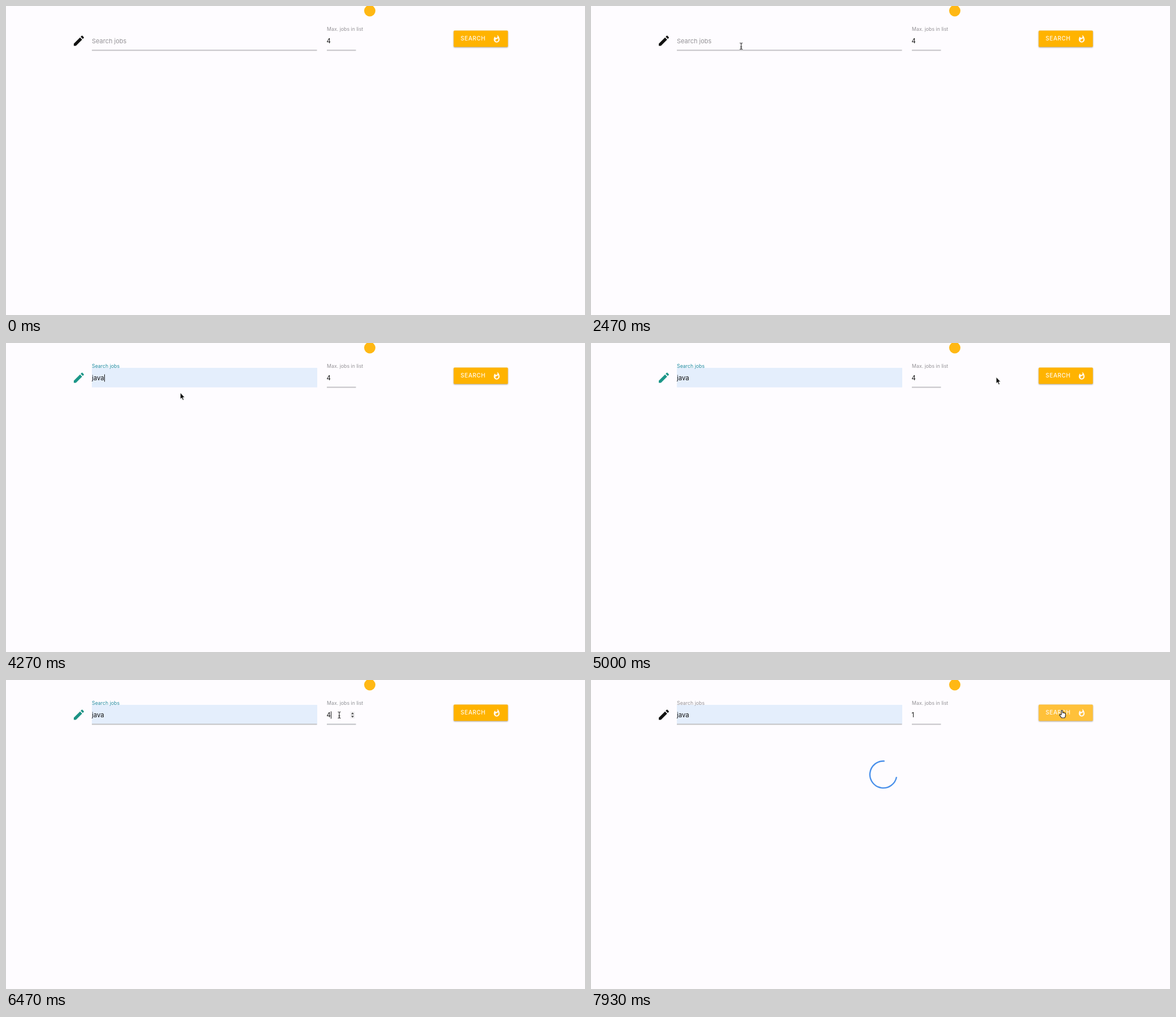
Write an HTML page that moves like this. It is 1025 px wide and 547 px high and loops after 8000 ms.

```html
<!DOCTYPE html>
<html lang="en">
<head>
<meta charset="utf-8">
<title>Job search</title>
<style>
  html, body { margin: 0; width: 100%; height: 100%; overflow: hidden; background: #fefcff; }
  svg { display: block; width: 100%; height: 100%; }
  text { font-family: Inter, Roboto, sans-serif; }
  .input { font-size: 11.4px; fill: #111; }
  .item { font-size: 10.1px; font-weight: 500; fill: #222; }
  .menu { filter: drop-shadow(0 1px 1.2px rgba(0, 0, 0, .42)); }
  .button { filter: drop-shadow(0 1px 1px rgba(0, 0, 0, .35)); }
</style>
</head>
<body>
<svg viewBox="0 0 1025 547" preserveAspectRatio="none">
  <rect width="1025" height="547" fill="#fefcff"/>
  <circle cx="644" cy="8.5" r="10" fill="#ffb814"/>

  <path id="pencil" transform="translate(117 49.5)" d="M3 17.25V21h3.75L17.81 9.94l-3.75-3.75L3 17.25zM20.71 7.04c.39-.39.39-1.02 0-1.41l-2.34-2.34c-.39-.39-1.02-.39-1.41 0l-1.83 1.83 3.75 3.75 1.83-1.83z"/>

  <rect id="fill" x="152" y="44" width="399" height="34.5" fill="#e4eefc"/>
  <rect id="queryLine" x="152" y="77.4" width="398.5" height="2" fill="#c4c2c6"/>
  <g id="queryLabel"><text font-size="11">Search jobs</text></g>
  <text id="query" class="input" x="152" y="65.8">java</text>

  <text id="countLabel" x="568" y="43.8" font-size="8.8">Max. jobs in list</text>
  <text id="count" class="input" x="567.5" y="65.8"></text>
  <rect id="countLine" x="568" y="77.4" width="51.5" height="2"/>
  <g id="stepper">
    <rect x="609.5" y="56" width="8" height="12" fill="#efeef0"/>
    <path d="M611 60.6l2.5-3 2.5 3zM611 63.4l2.5 3 2.5-3z" fill="#444"/>
  </g>
  <rect id="caret" y="55.5" width="1" height="13" fill="#111"/>

  <g class="button">
    <rect id="button" x="792.5" y="43.5" width="96" height="29" rx="1.5"/>
  </g>
  <text x="804.8" y="61.2" font-size="10" font-weight="500" letter-spacing=".55" fill="#fffaf0">SEARCH</text>
  <path transform="translate(861 50.6) scale(.64)" fill="#fffaf0" d="M13.5.67s.74 2.65.74 4.8c0 2.06-1.35 3.73-3.41 3.73-2.07 0-3.63-1.67-3.63-3.73l.03-.36C5.21 7.51 4 10.62 4 14c0 4.42 3.58 8 8 8s8-3.58 8-8C20 8.61 17.41 3.8 13.5.67zM11.71 19c-1.78 0-3.22-1.4-3.22-3.14 0-1.62 1.05-2.76 2.81-3.12 1.77-.36 3.6-1.21 4.62-2.58.39 1.29.59 2.65.59 4.04 0 2.65-2.15 4.8-4.8 4.8z"/>

  <g id="menu" class="menu">
    <rect x="152" y="80" width="146.5" height="95.5" fill="#fff"/>
    <text class="item" x="160" y="103.8">java</text>
    <text class="item" x="160" y="131.5">clojure</text>
    <text class="item" x="160" y="159.2">IT jobs</text>
  </g>

  <path id="spinner" fill="none" stroke="#4a90ea" stroke-width="2.4"/>

  <g id="pointer">
    <path id="arrow" d="M0 0V11.5L2.6 9.2 4.4 13.4 6.4 12.5 4.6 8.5H8z" fill="#111" stroke="#fff" stroke-width=".8"/>
    <path id="beam" d="M-2.5-5.5Q0-5.5 0-4V4Q0 5.5-2.5 5.5M2.5-5.5Q0-5.5 0-4M0 4Q0 5.5 2.5 5.5M-1.5 1.5H1.5" fill="none" stroke="#222" stroke-width="1.1"/>
    <path id="hand" d="M-1.5-4.5Q0-6 1 -4.5V-1Q2-2 3-.7Q4-1.5 4.8-.2Q6-.6 6 1V4Q6 6 4.5 8H-1L-4.5 3Q-4.5 1-1.5 2.5z" fill="#fff" stroke="#222" stroke-width="1.2"/>
  </g>
</svg>
<script>
const LOOP = 8000;
const GREY = [148, 146, 150], TEAL = [28, 138, 160], BLACK = [17, 17, 17], GREEN = [27, 150, 136];
const LINE = [196, 194, 198], AMBER = [255, 179, 0], LIGHT = [255, 193, 58];
const T = { menu: 2930, label: 3110, pick: 4030, count: 6450, clear: 6640, type: 6780, submit: 7500 };

// time, x, y of the pointer
const route = [
  [100, 885, 164], [400, 885, 164], [560, 805, 142], [680, 723, 117], [830, 535, 98],
  [930, 415, 86], [1070, 297, 75], [2240, 297, 75], [2470, 266, 71], [2800, 222, 68],
  [2930, 222, 68], [3070, 191, 81], [3640, 191, 81], [3860, 176, 97], [4030, 176, 97],
  [4270, 308, 88], [4470, 420, 75], [4900, 690, 61], [5330, 806, 58], [5400, 806, 58],
  [5800, 621, 60], [6130, 590, 62], [6800, 590, 62], [7130, 773, 47], [7200, 773, 47],
  [7420, 834, 59], [8000, 834, 59]
];

const el = {};
document.querySelectorAll("[id]").forEach(n => el[n.id] = n);

const clamp = v => Math.max(0, Math.min(1, v));
const ramp = (t, from, ms) => { const k = clamp((t - from) / ms); return k * k * (3 - 2 * k); };
const mix = (a, b, k) => a + (b - a) * k;
const blend = (a, b, k) => `rgb(${a.map((v, i) => Math.round(mix(v, b[i], k)))})`;
const set = (n, attrs) => { for (const k in attrs) n.setAttribute(k, attrs[k]); };
const show = (n, on) => n.setAttribute("visibility", on ? "visible" : "hidden");
const within = (t, a, b) => t >= a && t < b;

function pointerAt(t) {
  let i = 1;
  while (i < route.length - 1 && route[i][0] < t) i++;
  const [a, b] = [route[i - 1], route[i]];
  const k = clamp((t - a[0]) / (b[0] - a[0]));
  return [mix(a[1], b[1], k), mix(a[2], b[2], k)];
}

function drawPointer(t) {
  const [x, y] = pointerAt(t);
  const onButton = x >= 792 && x <= 889 && y < 73;
  const onQuery = x >= 152 && x <= 550 && y >= 44 && y < 79;
  const onCount = x >= 568 && x <= 608 && y >= 44 && y < 79;
  const inField = onQuery || onCount;
  set(el.pointer, { transform: `translate(${x} ${y})` });
  show(el.pointer, t >= 100);
  for (const [n, on] of [[el.hand, onButton], [el.beam, inField], [el.arrow, !onButton && !inField]])
    n.setAttribute("display", on ? "inline" : "none");
  return { onButton, onCount };
}

function drawCaret(t) {
  let x = 152, on = within(t, T.label, 3530);
  if (within(t, T.pick, T.count)) {
    x = 174;
    on = t < 4530 || (t - 4530) % 1000 >= 500;
  } else if (within(t, T.count, T.submit)) {
    x = t < T.clear ? 575 : t < T.type ? 568 : 573.6;
    on = true;
  }
  set(el.caret, { x });
  show(el.caret, on);
}

function drawSpinner(t) {
  show(el.spinner, t >= T.submit);
  if (t < T.submit) return;
  const half = mix(4, 132.5, ramp(t, T.submit, 430));
  const mid = 142.5 + (t - 7930) * .43;
  const at = deg => {
    const r = deg * Math.PI / 180;
    return `${517.5 + 23.8 * Math.cos(r)} ${167.3 + 23.8 * Math.sin(r)}`;
  };
  set(el.spinner, { d: `M${at(mid - half)}A23.8 23.8 0 ${half > 90 ? 1 : 0} 1 ${at(mid + half)}` });
}

function draw(t) {
  const { onButton, onCount } = drawPointer(t);
  const leave = ramp(t, T.count, 200);
  const queryFocus = ramp(t, T.label, 200) * (1 - leave);
  const countFocus = leave * (1 - ramp(t, T.submit, 200));
  const float = ramp(t, T.label, 200);

  set(el.pencil, { fill: blend(BLACK, GREEN, ramp(t, T.menu + 60, 300) * (1 - leave)) });
  set(el.queryLabel, {
    transform: `translate(152 ${mix(65.6, 43.8, float)}) scale(${mix(1, .8, float)})`,
    fill: blend(GREY, TEAL, queryFocus)
  });
  show(el.queryLine, !within(t, T.menu, T.count));
  show(el.menu, within(t, T.menu, T.pick));
  show(el.fill, t >= T.pick);
  show(el.query, t >= T.pick);

  set(el.countLabel, { fill: blend(GREY, TEAL, countFocus) });
  set(el.countLine, { fill: blend(LINE, TEAL, countFocus) });
  el.count.textContent = t < T.clear ? "4" : t < T.type ? "" : "1";
  show(el.stepper, onCount || within(t, T.count, T.submit));

  set(el.button, { fill: blend(AMBER, LIGHT, onButton ? 1 : 0) });
  drawCaret(t);
  drawSpinner(t);
}

const start = performance.now();
function tick() {
  draw((performance.now() - start) % LOOP);
  requestAnimationFrame(tick);
}
tick();
</script>
</body>
</html>
```
